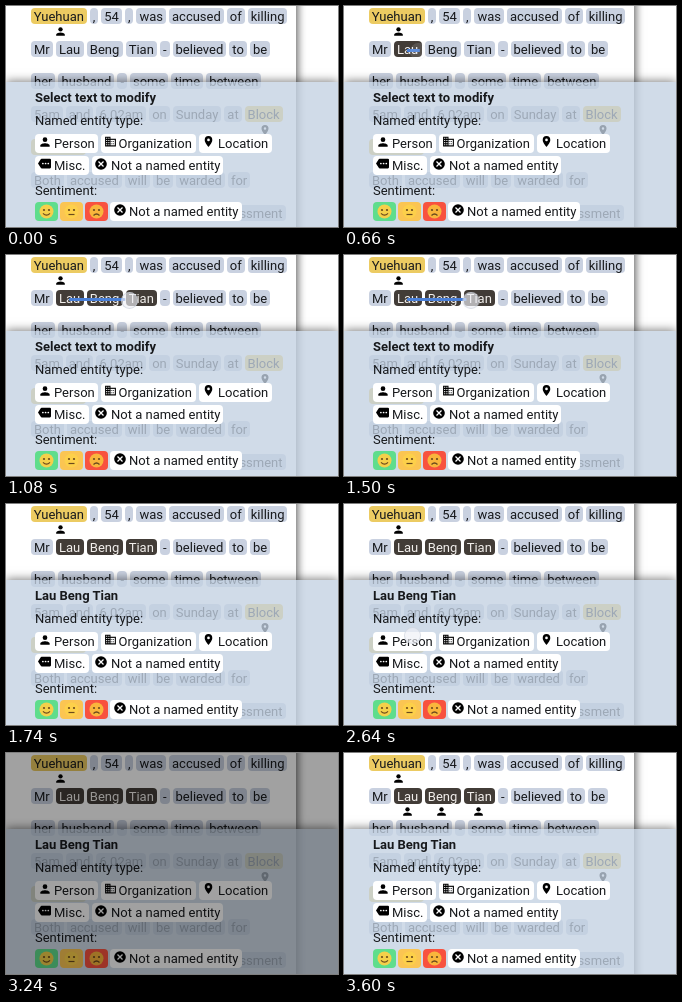
Write an HTML page that moves like this. It is 332 by 221 pixels and loops after 4500 ms.

```html
<!DOCTYPE html>
<html lang="en">
<head>
<meta charset="utf-8">
<title>Entity tagging</title>
<style>
html, body { margin: 0; width: 100%; height: 100%; overflow: hidden; background: #fff; }
body { position: relative; font: 13px/17px Roboto, Arial, sans-serif; color: #17191c; }
#stage { position: absolute; left: 0; top: 0; width: 332px; height: 221px; overflow: hidden; background: #fff; }
#stage * { box-sizing: border-box; }
svg { position: absolute; overflow: visible; }

/* Document */
.page { position: absolute; left: -10px; top: -20px; width: 300px; height: 270px; background: #fff; box-shadow: 2px 0 8px rgba(0,0,0,.6); }
.row { position: absolute; left: 25px; display: flex; gap: 3px; white-space: pre; }
.row span { height: 16px; padding: 0 3px; border-radius: 4px; background: #c9d1e0; text-align: center; }
.row .tag { background: #eccb62; padding: 0; }
.row .pick { padding: 0; }
.pick:nth-child(2) { width: 27.8px; animation: pick1 4.5s step-end infinite; }
.pick:nth-child(3) { width: 36px; animation: pick2 4.5s step-end infinite; }
.pick:nth-child(4) { width: 31.4px; animation: pick3 4.5s step-end infinite; }
.found { animation: found 4.5s step-end infinite; }

/* Panel */
.panel { position: absolute; left: 0; top: 76px; width: 332px; height: 145px; background: rgba(195,209,226,.78); box-shadow: 0 -1px 9px rgba(0,0,0,.5); }
.label, .btn { position: absolute; white-space: pre; }
.label { left: 29px; }
.title { font-weight: 700; top: 83px; }
.ask { animation: ask 4.5s step-end infinite; }
.name { animation: name 4.5s step-end infinite; }
.btn { height: 19px; line-height: 19px; padding-left: 19px; border-radius: 4px; background: #fff; }
.btn svg { left: 3px; top: 1px; }
.mood { position: absolute; top: 196px; width: 23px; height: 19px; border-radius: 4px; }
.mood svg { left: 3px; top: 1px; }

/* Touch */
.line { position: absolute; left: 63px; top: 43px; width: 64px; height: 3px; border-radius: 1px; background: #4a7fd6; transform-origin: 0 0; animation: line 4.5s infinite, line-on 4.5s step-end infinite; }
.dot { position: absolute; width: 17px; height: 17px; border-radius: 50%; background: rgba(238,240,246,.65); border: 1px solid rgba(196,202,214,.55); }
.drag { left: -8.5px; top: 36.5px; animation: drag 4.5s infinite, drag-on 4.5s step-end infinite; }
.tap { left: 59.5px; top: 123px; animation: tap 4.5s step-end infinite; }
.dim { position: absolute; inset: 0; background: #000; animation: dim 4.5s infinite; }

@keyframes pick1 { 0% { background: #c9d1e0; color: #17191c; } 14.66%, 100% { background: #423c37; color: #f2efec; } }
@keyframes pick2 { 0% { background: #c9d1e0; color: #17191c; } 17.32%, 100% { background: #423c37; color: #f2efec; } }
@keyframes pick3 { 0% { background: #c9d1e0; color: #17191c; } 22.66%, 100% { background: #423c37; color: #f2efec; } }
@keyframes found { 0% { opacity: 0; } 79.99%, 100% { opacity: 1; } }
@keyframes ask { 0% { opacity: 1; } 38.66%, 100% { opacity: 0; } }
@keyframes name { 0% { opacity: 0; } 38.66%, 100% { opacity: 1; } }
@keyframes line-on { 0% { opacity: 0; } 14.66% { opacity: 1; } 38.66%, 100% { opacity: 0; } }
@keyframes drag-on { 0% { opacity: 0; } 14.66% { opacity: .2; } 15.99% { opacity: 1; } 38.66%, 100% { opacity: 0; } }
@keyframes drag {
  0%, 14.66% { transform: translateX(74px); animation-timing-function: steps(7, end); }
  23.99% { transform: translateX(123px); animation-timing-function: steps(10, end); }
  37.32%, 100% { transform: translateX(128px); }
}
@keyframes line {
  0%, 14.66% { transform: scaleX(.2); animation-timing-function: steps(7, end); }
  23.99% { transform: scaleX(.88); animation-timing-function: steps(10, end); }
  37.32%, 100% { transform: scaleX(.95); }
}
@keyframes tap { 0% { opacity: 0; } 58.66% { opacity: 1; } 61.32% { opacity: .5; } 62.66%, 100% { opacity: 0; } }
@keyframes dim {
  0%, 58.66% { opacity: 0; animation-timing-function: steps(6, end); }
  66.66% { opacity: .37; animation-timing-function: step-end; }
  78.66% { opacity: .18; animation-timing-function: step-end; }
  79.99%, 100% { opacity: 0; }
}
</style>
</head>
<body>
<svg width="0" height="0">
  <symbol id="person" viewBox="0 0 24 24"><circle cx="12" cy="8" r="4"/><path d="M4 20v-2c0-2.7 5.3-4 8-4s8 1.3 8 4v2z"/></symbol>
  <symbol id="org" viewBox="0 0 24 24">
    <path d="M2 3h10v4h10v14H2z"/>
    <path d="M5 5v14M9 5v14" stroke="#fff" stroke-width="2" stroke-dasharray="2"/>
    <path d="M12 9h8v10h-8z" fill="#fff"/>
    <path d="M13 11v8M17 11v6" stroke="#17191c" stroke-width="2" stroke-dasharray="2"/>
  </symbol>
  <symbol id="place" viewBox="0 0 24 24"><path fill-rule="evenodd" d="M12 2a7 7 0 0 0-7 7c0 5.3 7 13 7 13s7-7.7 7-13a7 7 0 0 0-7-7zm0 4.5a2.5 2.5 0 1 1 0 5 2.5 2.5 0 0 1 0-5z"/></symbol>
  <symbol id="misc" viewBox="0 0 24 24"><path d="M22 3H7q-1 0-1.6.9L0 12l5.4 8.1Q6 21 7 21h15q2 0 2-2V5q0-2-2-2z"/><g fill="#fff"><circle cx="9" cy="12" r="1.6"/><circle cx="14" cy="12" r="1.6"/><circle cx="19" cy="12" r="1.6"/></g></symbol>
  <symbol id="none" viewBox="0 0 24 24"><circle cx="12" cy="12" r="10"/><path d="M7.7 7.7l8.6 8.6m0-8.6l-8.6 8.6" stroke="#fff" stroke-width="2.2"/></symbol>
  <symbol id="eyes" viewBox="0 0 17 17"><g fill="#6b4a1c"><circle cx="6" cy="7" r="1.1"/><circle cx="11" cy="7" r="1.1"/></g></symbol>
</svg>

<div id="stage">
  <div class="page"></div>
  <div class="row" style="top:2px"><span class="tag" style="width:55.7px">Yuehuan</span><span>,</span><span>54</span><span>,</span><span>was</span><span>accused</span><span>of</span><span>killing</span></div>
  <div class="row" style="top:35px"><span>Mr</span><span class="pick">Lau</span><span class="pick">Beng</span><span class="pick">Tian</span><span>-</span><span>believed</span><span>to</span><span>be</span></div>
  <div class="row" style="top:67px"><span>her</span><span>husband</span><span>-</span><span>some</span><span>time</span><span>between</span></div>
  <div class="row" style="top:100px"><span>5am</span><span>and</span><span>6.02am</span><span>on</span><span>Sunday</span><span>at</span><span class="tag" style="width:38px">Block</span></div>
  <div class="row" style="top:133px"><span class="tag" style="width:55px"></span></div>
  <div class="row" style="top:166px"><span>Both</span><span>accused</span><span>will</span><span>be</span><span>warded</span><span>for</span></div>
  <div class="row" style="top:199px;left:203px"><span>assessment</span></div>
  <svg width="13" height="13" style="left:47.5px;top:19px"><use href="#person"/></svg>
  <svg width="12" height="12" style="left:252.5px;top:118px"><use href="#place"/></svg>
  <div class="found">
    <svg width="13" height="13" style="left:56.5px;top:52px"><use href="#person"/></svg>
    <svg width="13" height="13" style="left:91px;top:52px"><use href="#person"/></svg>
    <svg width="13" height="13" style="left:127.5px;top:52px"><use href="#person"/></svg>
  </div>

  <div class="panel"></div>
  <div class="label title ask">Select text to modify</div>
  <div class="label title name">Lau Beng Tian</div>
  <div class="label" style="top:106px">Named entity type:</div>
  <div class="btn" style="left:29px;top:128px;width:63px"><svg width="14" height="14"><use href="#person"/></svg>Person</div>
  <div class="btn" style="left:95px;top:128px;width:95px;padding-left:17.5px"><svg width="13" height="13"><use href="#org"/></svg>Organization</div>
  <div class="btn" style="left:193px;top:128px;width:73px"><svg width="13" height="13"><use href="#place"/></svg>Location</div>
  <div class="btn" style="left:29px;top:150px;width:54px"><svg width="13" height="13"><use href="#misc"/></svg>Misc.</div>
  <div class="btn" style="left:86px;top:150px;width:131px"><svg width="14" height="14" style="left:2px"><use href="#none"/></svg>Not a named entity</div>
  <div class="label" style="top:176px">Sentiment:</div>
  <div class="mood" style="left:29px;background:#5fdd8c"><svg width="17" height="17" viewBox="0 0 17 17"><circle cx="8.5" cy="8.5" r="7" fill="#f5d04a"/><path d="M5 10.3q3.5 3.5 7 0" fill="none" stroke="#6b4a1c" stroke-width="1.2"/><use href="#eyes"/></svg></div>
  <div class="mood" style="left:54px;background:#fbc552"><svg width="17" height="17" viewBox="0 0 17 17"><circle cx="8.5" cy="8.5" r="7" fill="#fdd04a"/><path d="M5.5 11.5h6" stroke="#6b4a1c" stroke-width="1.2"/><use href="#eyes"/></svg></div>
  <div class="mood" style="left:79px;background:#f8523f"><svg width="17" height="17" viewBox="0 0 17 17"><circle cx="8.5" cy="8.5" r="7" fill="#f9b53c"/><path d="M5.5 12.5q3-3 6 0" fill="none" stroke="#6b4a1c" stroke-width="1.3"/><use href="#eyes"/></svg></div>
  <div class="btn" style="left:104px;top:196px;width:132px"><svg width="14" height="14" style="left:2.5px"><use href="#none"/></svg>Not a named entity</div>

  <div class="line"></div>
  <div class="dot drag"></div>
  <div class="dot tap"></div>
  <div class="dim"></div>
</div>
</body>
</html>
```
